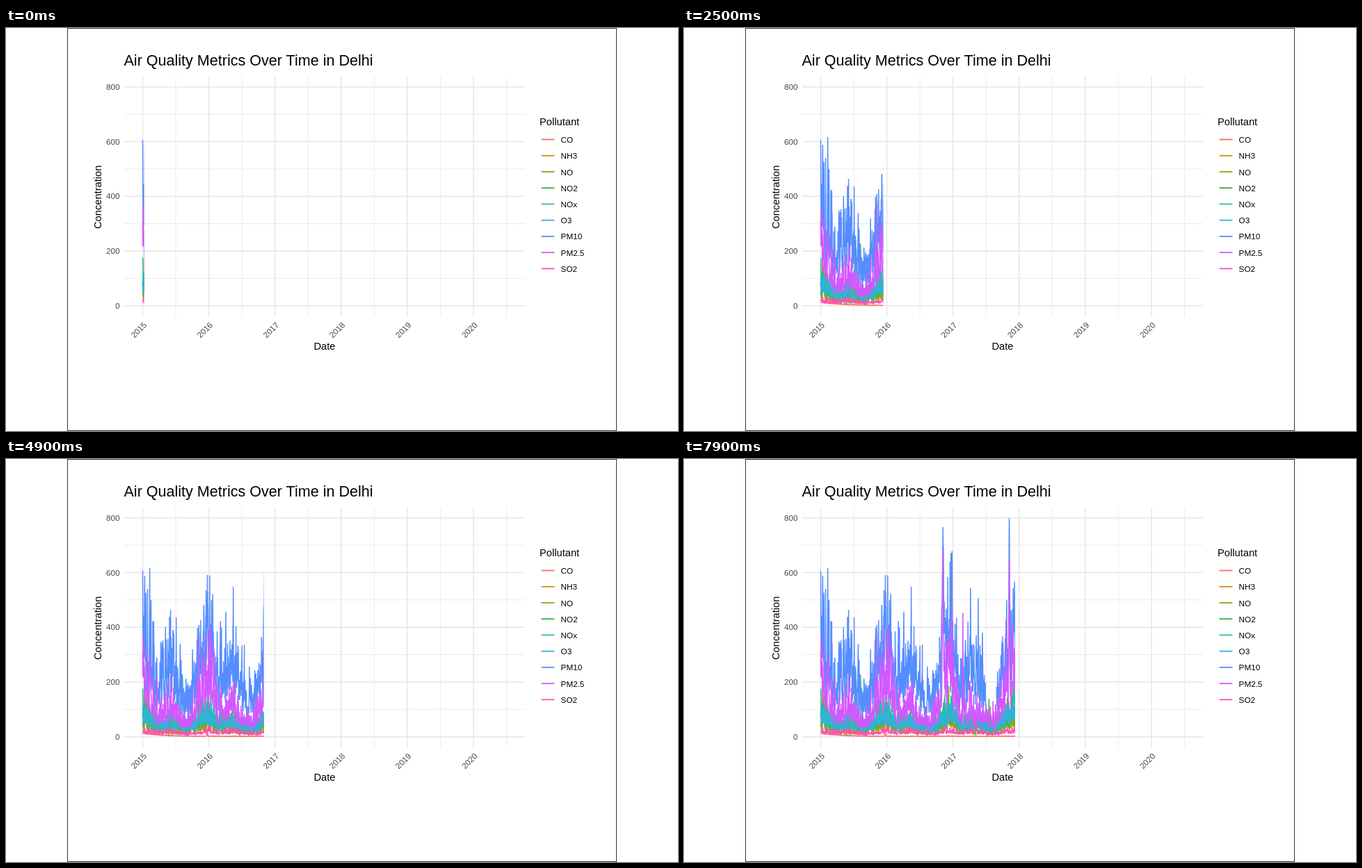
These frames come from a looping animation (966 px wide and 580 px high, 8 s). An HTML page:

```html
<!DOCTYPE html>
<html lang="en">
<head>
<meta charset="utf-8">
<title>Air Quality Metrics</title>
<style>
  html, body { margin: 0; width: 100%; height: 100%; overflow: hidden; background: #fff; }
  svg { position: absolute; left: 0; top: 0; width: 966px; height: 580px; }
  text { font-family: "Liberation Sans", Arial, sans-serif; font-size: 11.7px; }
  .title { font-size: 21.55px; }
  .name { font-size: 14.7px; }
  .tick { fill: #484848; }
  .mid { text-anchor: middle; }
  .end { text-anchor: end; }
  .major { stroke: #e6e6e6; stroke-width: 1.5; }
  .minor { stroke: #ebebeb; stroke-width: 1; }
  .key { stroke-width: 1.8; }
  .line { fill: none; stroke-width: 1.5; stroke-linejoin: round; }
  #data { animation: reveal 8s steps(80, end) infinite; }
  @keyframes reveal {
    from { clip-path: inset(0 767.4px 0 0); }
    to { clip-path: inset(0 486.4px 0 0); }
  }
</style>
</head>
<body>
<svg id="chart" viewBox="0 0 966 580">
  <rect x="88.5" y=".5" width="789" height="579" fill="none" stroke="#333"/>
  <text class="title" x="169.5" y="54">Air Quality Metrics Over Time in Delhi</text>
  <text class="name mid" x="458" y="463">Date</text>
  <text class="name mid" transform="translate(137 243.3) rotate(-90)">Concentration</text>
  <text class="name" x="767" y="140">Pollutant</text>
</svg>
<svg id="data" viewBox="0 0 966 580"></svg>
<script>
const X0 = 196.5, YEAR = 95.1, DAYS = 365.25, LAST = 1076;
const Y0 = 399.7, UNIT = 0.3938;
const chart = document.getElementById('chart');
const data = document.getElementById('data');
const xOf = day => X0 + day / DAYS * YEAR;
const yOf = v => Y0 - v * UNIT;

function add(parent, tag, attrs, text) {
  const el = document.createElementNS('http://www.w3.org/2000/svg', tag);
  for (const k in attrs) el.setAttribute(k, attrs[k]);
  if (text !== undefined) el.textContent = text;
  parent.append(el);
}

// Grid and axis labels: minor lines first, major lines above
const gridH = (v, c) => add(chart, 'path', { class: c, d: `M170 ${yOf(v)}H746` });
const gridV = (n, c) => add(chart, 'path', { class: c, d: `M${X0 + n * YEAR} 70V415.5` });
for (let v = 100; v < 800; v += 200) gridH(v, 'minor');
for (let n = 0.5; n < 6; n++) gridV(n, 'minor');
for (let v = 0; v <= 800; v += 200) {
  gridH(v, 'major');
  add(chart, 'text', { class: 'tick end', x: 163.5, y: yOf(v) + 4.1 }, v);
}
for (let n = 0; n < 6; n++) {
  gridV(n, 'major');
  const at = `translate(${X0 + n * YEAR - 5.8} 434.6) rotate(-45)`;
  add(chart, 'text', { class: 'tick mid', transform: at, y: 4.1 }, 2015 + n);
}

function random(seed) {
  return () => {
    seed = (seed + 0x6D2B79F5) | 0;
    let t = Math.imul(seed ^ (seed >>> 15), 1 | seed);
    t = (t + Math.imul(t ^ (t >>> 7), 61 | t)) ^ t;
    return ((t ^ (t >>> 14)) >>> 0) / 4294967296;
  };
}

// Day-to-day drift between about -2 and 2
function drift(seed) {
  const rand = random(seed);
  let level = 0;
  return Array.from({ length: LAST + 1 }, () => {
    level += (rand() * 2 - 1 - level) * 0.55;
    return level * 2;
  });
}

// Yearly bump around a phase of the season cycle
function season(day, phase) {
  const p = day / 352 - phase + 0.5;
  return Math.exp(-(((p - Math.floor(p) - 0.5) / 0.18) ** 2));
}

const weather = drift(5);

// Seasonal level times drift; surges are [day, height, days to fade]
function linePath({ base, winter, summer, spread, surges = [], gap }, seed) {
  const own = drift(seed);
  let d = '', pen = 'M';
  for (let day = 0; day <= LAST; day++) {
    if (gap && day > gap[0] && day < gap[1]) { pen = 'M'; continue; }
    let v = base + winter * season(day, 0) + summer * season(day, 0.42);
    let sway = 1;
    for (const [at, height, fade] of surges) {
      const k = Math.exp(-Math.abs(day - at) / fade);
      if (height * k > v) { v = height * k; sway = 1 - k; }
    }
    v *= Math.exp(spread * sway * (0.6 * weather[day] + 0.8 * own[day]));
    d += pen + xOf(day).toFixed(2) + ' ' + yOf(v).toFixed(1);
    pen = 'L';
  }
  return d;
}

const series = [
  { name: 'CO', color: '#fa6c64', base: 1.5, winter: 0.5, summer: 0, spread: 0.3, surges: [[0, 12, 150], [357, 25, 2]] },
  { name: 'NH3', color: '#cf8d10', base: 35, winter: 12, summer: 5, spread: 0.3, surges: [[10, 160, 12]] },
  { name: 'NO', color: '#92a412', base: 14, winter: 40, summer: 8, spread: 0.7, surges: [[730, 190, 3]] },
  { name: 'NO2', color: '#2fb53c', base: 30, winter: 40, summer: 25, spread: 0.4, surges: [[929, 137, 2]] },
  { name: 'NOx', color: '#2fbd97', base: 28, winter: 60, summer: 28, spread: 0.5, surges: [[192, 255, 8], [219, 226, 10]] },
  { name: 'O3', color: '#2fb3da', base: 25, winter: 45, summer: 22, spread: 0.45 },
  { name: 'PM10', color: '#558dff', base: 105, winter: 245, summer: 135, spread: 0.45, gap: [915, 971],
    surges: [[0, 607, 2], [46, 498, 2], [148, 436, 2], [185, 435, 2], [357, 590, 2], [370, 588, 3],
      [675, 765, 10], [722, 617, 3], [827, 543, 3], [870, 505, 3], [1041, 797, 5]] },
  { name: 'PM2.5', color: '#d357ff', base: 42, winter: 150, summer: 55, spread: 0.5,
    surges: [[0, 313, 2], [307, 365, 2], [367, 395, 3], [676, 690, 6], [785, 452, 2], [1023, 427, 3], [1041, 640, 5]] },
  { name: 'SO2', color: '#ff4fb9', base: 9, winter: 10, summer: 11, spread: 0.4, surges: [[855, 62, 8]] }
];

series.forEach((s, i) => {
  const y = 160.5 + i * 23.23;
  add(chart, 'path', { class: 'key', stroke: s.color, d: `M769.5 ${y}H788.3` });
  add(chart, 'text', { x: 797.6, y: y + 4.6 }, s.name);
  add(data, 'path', { class: 'line', stroke: s.color, d: linePath(s, 41 + i * 17) });
});
</script>
</body>
</html>
```
